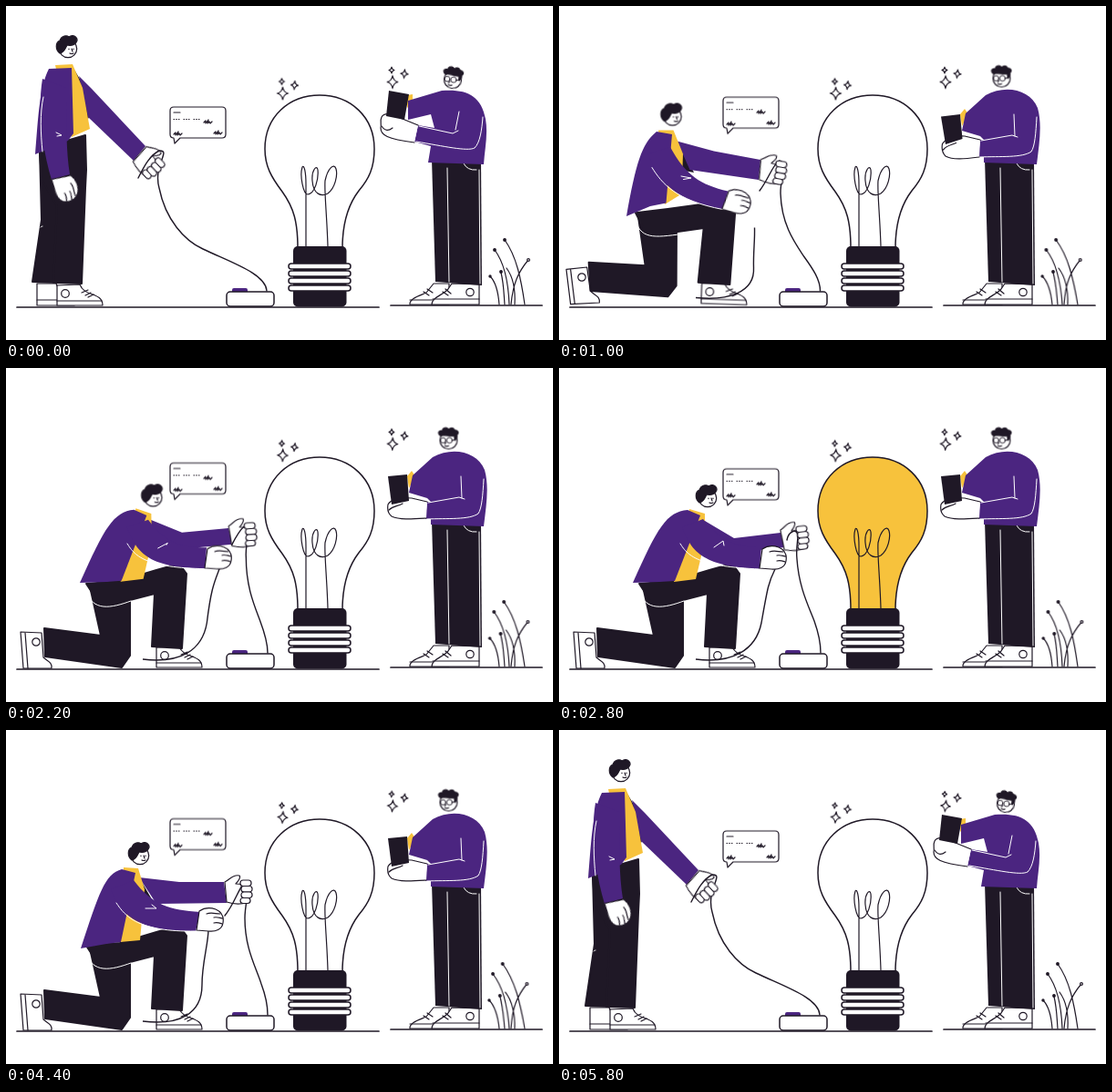
These frames come from a looping animation (600 by 367 pixels, 5.9 s). An HTML page without scripts:

```html
<!DOCTYPE html>
<html lang="en">
<head>
<meta charset="utf-8">
<title>Lighting the bulb</title>
<style>
html, body { margin: 0; width: 100%; height: 100%; overflow: hidden; background: #fff; }
svg { display: block; width: 100vw; height: 100vh; }
.ink { fill: none; stroke: #1f1826; stroke-width: 1.2; stroke-linecap: round; stroke-linejoin: round; }
.skin { fill: #fff; }
.dark { fill: #1f1826; }
.leg { fill: #1f1826; stroke: #1f1826; stroke-width: 2; stroke-linejoin: round; }
.coat { fill: #4b2580; }
.gold { fill: #f7c23c; }
.seam { fill: none; stroke: #fff; stroke-width: 1; stroke-linecap: round; stroke-linejoin: round; }

/* everything plays forward, then backward */
.go, .ease { animation: var(--k) 2950ms steps(6) -20ms infinite alternate; }
.ease { animation-timing-function: ease-in-out; }
.twinkle { animation: twinkle 737.5ms ease-in-out infinite alternate; }
.twinkle.late { animation-delay: -400ms; }

@keyframes twinkle { to { transform: scale(.86) rotate(8deg); } }
@keyframes bubble { 0%, 100% { transform: none; } 50% { transform: translateY(-13.5px); } }
@keyframes sway { 0% { transform: none; } 50% { transform: skewX(1.8deg); } 100% { transform: skewX(-.5deg); } }
@keyframes glow { 0%, 84.6% { fill: #fff; } 84.7%, 100% { fill: #f7c23c; } }

/* kneeling man: legs */
@keyframes rearLeg {
  0% { d: path("M37 158L68 150L64 240L60 270L57 304L29 303L39 235Z"); }
  20.3% { d: path("M77 215L115 230L114 290L104 300L18 305L14 273L76 268Z"); }
  40.6%, 100% { d: path("M92 240L136 240L136 316L127 329L43 317L42 286L104 294Z"); }
}
@keyframes frontLeg {
  0% { d: path("M37 160L70 147L87 142L88 180L87 200L83 305L52 304L56 220L39 190Z"); }
  20.3% { d: path("M76 208L108 201L165 206L179 208L184 222L176 302L138 299L150 236L81 232Z"); }
  40.6%, 100% { d: path("M88 237L125 234L165 222L190 215L198 226L193 308L160 306L163 248L105 263Z"); }
}
@keyframes legSeam {
  0% { d: path("M38 243C38 243 39 242 40 242"); }
  20.3% { d: path("M77 220C81 238 95 234 149 237"); }
  40.6%, 100% { d: path("M88 245C95 268 115 264 137 256"); }
}
@keyframes rearShoe {
  0% { d: path("M34 329L34 305L55 305C58 316 74 318 75 329L55 329Z"); }
  20.3% { d: path("M-8 288L14 279L21 303C26 310 34 309 33 318L0 323Z"); }
  40.6%, 100% { d: path("M16 290L39 291L41 318C45 322 51 323 50 330L19 330Z"); }
}
@keyframes rearSole {
  0% { d: path("M34 323L75 323"); }
  20.3% { d: path("M-4 287L4 322"); }
  40.6%, 100% { d: path("M21 291L24 330"); }
}
@keyframes rearDot {
  0% { transform: translate(62px, 316px); }
  20.3% { transform: translate(9px, 292px); }
  40.6%, 100% { transform: translate(33px, 301px); }
}
@keyframes frontShoe {
  0% { transform: translate(65px, 316px) rotate(0deg); }
  20.3% { transform: translate(148px, 310px) rotate(6deg); }
  40.6%, 100% { transform: translate(174px, 316px) rotate(0deg); }
}

/* kneeling man: upper body */
@keyframes torso {
  0% { d: path("M47 69C36 90 35 130 32 163L68 148L74 140L72 68Z"); }
  20.3% { d: path("M87 123C73 145 67 165 66 222L90 205L109 200L106 125Z"); }
  47.4%, 50.8% { d: path("M127 153C108 158 102 180 82 240L110 235L126 233L142 157Z"); }
  50.85% { d: path("M139 155C118 158 108 175 81 236L110 235L126 233L153 162Z"); }
  84.7%, 100% { d: path("M141 156C118 158 108 175 81 236L110 235L127 234L155 162Z"); }
}
@keyframes shirt {
  0% { d: path("M54 65L73 64L84 90L92 135L72 144Z"); }
  20.3% { d: path("M89 122L106 121L120 150L122 182L107 203Z"); }
  47.4%, 50.8% { d: path("M129 151L145 152L152 175L147 231L125 233Z"); }
  50.85% { d: path("M141 153L158 160L160 190L152 231L125 234Z"); }
  84.7%, 100% { d: path("M143 155L160 160L160 190L150 232L126 235Z"); }
}
@keyframes lining {
  0% { d: path("M75 70L82 82L92 120L88 128Z"); }
  20.3% { d: path("M110 135L121 150L126 172L116 168Z"); }
  47.4%, 50.8% { d: path("M146 162L160 186L170 194L148 192Z"); }
  50.85% { d: path("M156 164L168 184L176 192L158 192Z"); }
  84.7%, 100% { d: path("M160 168L168 186L174 194L160 192Z"); }
}
@keyframes farArm {
  0% { d: path("M80 77L94 91L153 154L140 170L90 122Z"); }
  20.3% { d: path("M113 135L150 152L203 171L196 192L122 169Z"); }
  47.4%, 50.8% { d: path("M146 162L190 167L239 167L242 190L165 191Z"); }
  50.85% { d: path("M156 164L195 168L246 166L250 187L165 192Z"); }
  84.7%, 100% { d: path("M160 168L192 187L243 181L248 197L165 206Z"); }
}
@keyframes nearArm {
  0% { d: path("M40 80C35 110 38 150 50 191L70 185C66 160 66 130 66 90Z"); }
  20.3% { d: path("M80 150C95 185 110 205 151 226L158 207C130 195 118 180 104 145Z"); }
  47.4%, 50.8% { d: path("M115 175C125 200 140 222 208 221L213 200C180 198 160 192 140 165Z"); }
  50.85% { d: path("M128 175C140 205 150 222 215 220L216 198C185 197 168 195 152 168Z"); }
  84.7%, 100% { d: path("M135 175C145 200 155 218 220 221L222 197C195 197 180 192 158 166Z"); }
}
@keyframes armSeam {
  0% { d: path("M41 100C37 118 38 140 40 160M55 139L61 142L56 143"); }
  20.3% { d: path("M83 165C95 185 110 205 151 226M120 185L125 182L108 182"); }
  47.4%, 50.8% { d: path("M121 190C131 205 145 222 208 221M153 196L165 196L160 192"); }
  50.85% { d: path("M133 193C142 208 155 222 215 220M160 200L172 197L166 193"); }
  84.7%, 100% { d: path("M133 193C142 208 155 218 220 221M170 197L180 190L181 195"); }
}
@keyframes nearHand {
  0% { transform: translate(60px, 188px) rotate(70deg); }
  20.3% { transform: translate(154px, 217px) rotate(25deg); }
  47.4%, 50.8% { transform: translate(210px, 210px) rotate(0deg); }
  50.85% { transform: translate(215px, 209px) rotate(0deg); }
  84.7%, 100% { transform: translate(221px, 210px) rotate(0deg); }
}
@keyframes farHand {
  0% { transform: translate(146px, 162px) rotate(47deg); }
  20.3% { transform: translate(199px, 181px) rotate(20deg); }
  47.4%, 50.8% { transform: translate(240px, 178px) rotate(0deg); }
  50.85% { transform: translate(247px, 176px) rotate(0deg); }
  84.7%, 100% { transform: translate(244px, 189px) rotate(-6deg); }
}
@keyframes head {
  0% { transform: translate(68px, 47px); }
  20.3% { transform: translate(102px, 105px); }
  47.4%, 50.8% { transform: translate(147px, 138px); }
  50.85% { transform: translate(158px, 141px); }
  84.7%, 100% { transform: translate(163px, 143px); }
}

/* cables: plug end and run to the socket, then the loose end */
@keyframes cable {
  0% { d: path("M145 189C152 175 158 164 168 159C182 158 161 175 168 200C175 235 196 258 216 267C245 281 285 294 286 313"); }
  20.3% { d: path("M200 202C210 188 213 175 222 172C234 174 223 190 224 205C226 240 243 260 257 271C272 284 286 297 286 313"); }
  47.4%, 50.8% { d: path("M240 204C250 192 255 175 261 168C271 170 262 185 262 207C262 240 274 260 280 279C286 295 287 305 287 313"); }
  50.85% { d: path("M243 205C253 192 261 175 267 165C279 170 268 185 268 205C264 240 270 260 276 277C283 294 287 302 287 313"); }
  84.7%, 100% { d: path("M250 189C251 184 254 180 258 179C266 180 259 193 261 210C263 240 273 260 280 278C285 292 287 303 287 313"); }
}
@keyframes loose {
  0% { stroke-dashoffset: 1; visibility: hidden; }
  6.8% { stroke-dashoffset: 1; visibility: visible; }
  0%, 20.3% { d: path("M150 321C180 323 215 318 212 295C211 285 208 280 207 268"); }
  20.3%, 100% { stroke-dashoffset: 0; visibility: visible; }
  47.4%, 50.8% { d: path("M150 320C190 325 215 312 215 280C215 255 222 235 222 219"); }
  50.85% { d: path("M150 320C195 325 214 310 217 280C217 245 226 235 229 218"); }
  84.7%, 100% { d: path("M150 320C190 325 216 310 222 280C229 240 230 235 237 221"); }
}

/* man with the tablet */
@keyframes sweater {
  0% { d: path("M441 104L478 93C505 91 521 98 526 124C529 141 525 158 524 174L463 172L466 154L448 149L452 131L470 134L466 119L441 125Z"); }
  20.3%, 100% { d: path("M446 118L468 98C490 86 517 92 525 112C530 130 527 150 524 174L466 172L466 166L460 166L462 147L466 147L462 143L442 137Z"); }
}
@keyframes folds {
  0% { d: path("M523 122C522 136 520 150 514 156C506 160 480 154 450 149M497 116L493 136M453 132L490 140L496 137"); }
  20.3%, 100% { d: path("M524 122C523 140 522 154 518 160C508 167 485 165 461 166M499 119L500 143M463 148L497 142L503 144"); }
}
@keyframes palm {
  0% { d: path("M452 131L430 122C422 117 414 118 412 122C410 126 412 129 411 134C411 142 418 146 448 150"); }
  20.3% { d: path("M462 147L445 143C436 142 425 148 422 153C421 158 421 162 425 167C432 172 445 170 461 167"); }
  47.4%, 100% { d: path("M462 147L445 143C434 142 422 144 419 150C418 156 419 160 423 163C432 167 445 166 461 165"); }
}
@keyframes thumb {
  0% { d: path("M412 132C416 138 420 137 424 134"); }
  20.3% { d: path("M423 160C427 154 431 154 436 152"); }
  47.4%, 100% { d: path("M420 156C425 151 430 152 435 149"); }
}
@keyframes tablet {
  0% { d: path("M420 93L442 97L437 125L417 121Z"); }
  20.3% { d: path("M419 124L440 121L443 146L425 154Z"); }
  47.4%, 100% { d: path("M419 119L440 117L442 146L423 150Z"); }
}
@keyframes cuff {
  0% { d: path("M440 98L446 97L446 106L440 112Z"); }
  20.3%, 100% { d: path("M440 119L445 113L449 119L442 132Z"); }
}
@keyframes reader {
  0% { transform: translate(490px, 81px) rotate(8deg); }
  20.3%, 100% { transform: translate(485.5px, 79.5px) rotate(0deg); }
}
</style>
</head>
<body>
<svg viewBox="0 0 600 367" preserveAspectRatio="none">
  <defs>
    <path id="star" d="M0-7Q1-1 6 0Q1 1 0 7Q-1 1-6 0Q-1-1 0-7Z" vector-effect="non-scaling-stroke"/>
    <path id="scrawl" d="M0 2L2 0L2 3L5-1L4 3L6 1L7 3L9 1"/>
    <g id="shoe" class="ink">
      <path class="skin" d="M-9 13L-9-9L16-10C21 4 41-2 41 13Z"/>
      <path d="M-9 8L40 8M18-1L25-4M22 2L28-1M25 4L31 1"/>
      <circle r="4.3"/>
    </g>
    <g id="sparks" class="ink">
      <use href="#star" class="twinkle"/>
      <g transform="translate(13 -9) scale(.75)"><use href="#star" class="twinkle late"/></g>
      <g transform="translate(-1 -13) scale(.5)"><use href="#star" class="twinkle"/></g>
    </g>
  </defs>

  <!-- scene -->
  <path class="ink" style="stroke-width:1.7" d="M12 331H409M422 329H588"/>
  <path class="coat" d="M248 315V312Q248 310 250 310H263Q265 310 265 312V315Z"/>
  <rect class="ink skin" style="stroke-width:1.5" x="242" y="314" width="52" height="16" rx="4"/>

  <path class="ink go" style="--k:glow;stroke-width:1.5" d="M320 266C320 238 316 222 303 204C291 188 284 176 284 157C284 121 311 98 344 98C378 98 404 122 404 157C404 178 398 190 387 203C374 220 369 242 369 266"/>
  <path class="ink" d="M329 264V196C329 182 327 174 325 177C322 186 326 207 331 207C339 206 343 190 342 180C341 174 335 180 336 192C337 207 346 210 353 206C361 200 364 186 362 179C360 172 353 178 350 192C349 204 352 230 353 264"/>
  <rect class="dark" x="315" y="264" width="58.5" height="66.5" rx="5"/>
  <g class="ink" style="stroke-width:1.5">
    <rect class="skin" x="310" y="283" width="68" height="6" rx="3"/>
    <rect class="skin" x="310" y="291" width="68" height="6" rx="3"/>
    <rect class="skin" x="310" y="299" width="68" height="6" rx="3"/>
    <rect class="skin" x="310" y="307" width="68" height="6" rx="3"/>
  </g>

  <g class="ink ease" style="--k:bubble">
    <path class="skin" d="M184 111H237Q241 111 241 115V141Q241 145 237 145H191L185 151L184 145Q180 145 180 141V115Q180 111 184 111Z"/>
    <path d="M184 117H191"/>
    <path stroke-dasharray=".6 2.1" d="M184 124.5H192M195 124.5H203M206 124.5H214"/>
    <use href="#scrawl" x="217" y="126"/>
    <use href="#scrawl" x="184" y="139"/>
    <use href="#scrawl" x="228" y="138"/>
  </g>

  <use href="#sparks" x="303.5" y="96"/>
  <use href="#sparks" x="424" y="83.5"/>

  <g class="ink ease" style="--k:sway;transform-origin:555px 329px">
    <path d="M552 328C551 302 545 280 536 268M569 328C565 300 560 275 547 257M554 328C556 305 562 292 573 279M541 328C540 315 537 303 531 297M547 328C546 315 546 305 543 293M558 328C559 310 555 296 549 288"/>
    <g class="dark">
      <circle cx="536" cy="268" r="1.3"/><circle cx="547" cy="257" r="1.3"/>
      <circle class="skin" cx="573" cy="279" r="1.4"/><circle cx="531" cy="297" r="1.1"/>
      <circle cx="543" cy="292" r="1.3"/>
    </g>
  </g>

  <!-- man with the tablet -->
  <g class="ink">
    <path class="skin" d="M443 328C442 321 455 318 461 315L469 305L486 305V328Z"/>
    <path d="M443 323H480M458 314L464 318M462 311L468 315"/>
    <path class="skin" d="M467 328C467 320 479 318 485 311L489 305L519 306V328Z"/>
    <path d="M468 322H519M482 311L488 316M479 314L485 318"/>
    <circle cx="509" cy="314.5" r="4.2"/>
  </g>
  <path class="dark" d="M467 168L521 170L522 307L471 303Z"/>
  <path class="seam" d="M484 178L486 303M519 180L520 305M502 173Q506 181 516 180"/>
  <path class="gold go" style="--k:cuff"/>
  <path class="coat go" style="--k:sweater"/>
  <path class="seam go" style="--k:folds"/>
  <path class="ink skin go" style="--k:palm"/>
  <path class="dark go" style="--k:tablet"/>
  <path class="ink go" style="--k:thumb"/>
  <g class="ink go" style="--k:reader">
    <circle class="skin" r="9.5"/>
    <path class="dark" d="M-9-5C-13-8-10-12-7-10C-7-14-2-15 0-12C3-15 7-13 6-11C10-12 12-8 9-6C10-3 8-1 7 0L6-5C2-4-4-6-9-5Z"/>
    <g stroke-width=".9"><circle cx="-6" cy="0" r="2.9"/><circle cx="1" cy="0" r="3.1"/></g>
    <path d="M4 0L8-1M-3 2L-4 4M-4 6Q-2 7 0 6"/>
  </g>

  <!-- kneeling man -->
  <g class="ink">
    <path class="skin go" style="--k:rearShoe"/>
    <path class="go" style="--k:rearSole"/>
    <circle class="go" style="--k:rearDot" r="4.2"/>
  </g>
  <path class="leg go" style="--k:rearLeg"/>
  <g class="go" style="--k:frontShoe"><use href="#shoe"/></g>
  <path class="leg go" style="--k:frontLeg"/>
  <path class="seam go" style="--k:legSeam"/>
  <path class="dark go" style="--k:lining"/>
  <path class="coat go" style="--k:farArm"/>
  <path class="gold go" style="--k:shirt"/>
  <path class="coat go" style="--k:torso"/>
  <g class="ink go" style="--k:farHand">
    <path class="skin" d="M0-11C5-13 9-20 16-18C18-16 14-11 12-9L25-8L24 12C15 14 8 13 2 11Z"/>
  </g>
  <path class="ink go" style="--k:cable;stroke-width:1.4"/>
  <path class="ink go" style="--k:loose;stroke-width:1.4;stroke-linecap:butt" pathLength="1" stroke-dasharray="1"/>
  <g class="ink go" style="--k:farHand">
    <rect class="skin" x="17" y="-13" width="12" height="6.5" rx="3"/>
    <rect class="skin" x="18" y="-6.5" width="12" height="6.5" rx="3"/>
    <rect class="skin" x="18" y="0" width="12" height="6.5" rx="3"/>
    <rect class="skin" x="17" y="6.5" width="11" height="6" rx="3"/>
  </g>
  <path class="coat go" style="--k:nearArm"/>
  <path class="seam go" style="--k:armSeam"/>
  <g class="ink go" style="--k:nearHand">
    <path class="skin" d="M2-11C8-15 14-15 20-13C27-10 29-4 28 2C27 9 20 12 12 11L-1 10Z"/>
    <path d="M10-8C15-10 20-8 25-8M18-4C22-5 25-3 28-3M18 2C22 1 24 2 27 3"/>
  </g>
  <g class="ink go" style="--k:head">
    <circle class="skin" r="9.7"/>
    <path class="dark" d="M-9 5C-14 1-14-7-9-9C-7-15-1-15 1-13C7-17 12-11 9-7C8-4 3-3-1-4C-3 0-4 4-9 5Z"/>
    <path d="M1 0V.6M6 0V.6M4 0L5 3M2 5Q4 6 6 5"/>
  </g>
</svg>
</body>
</html>
```
